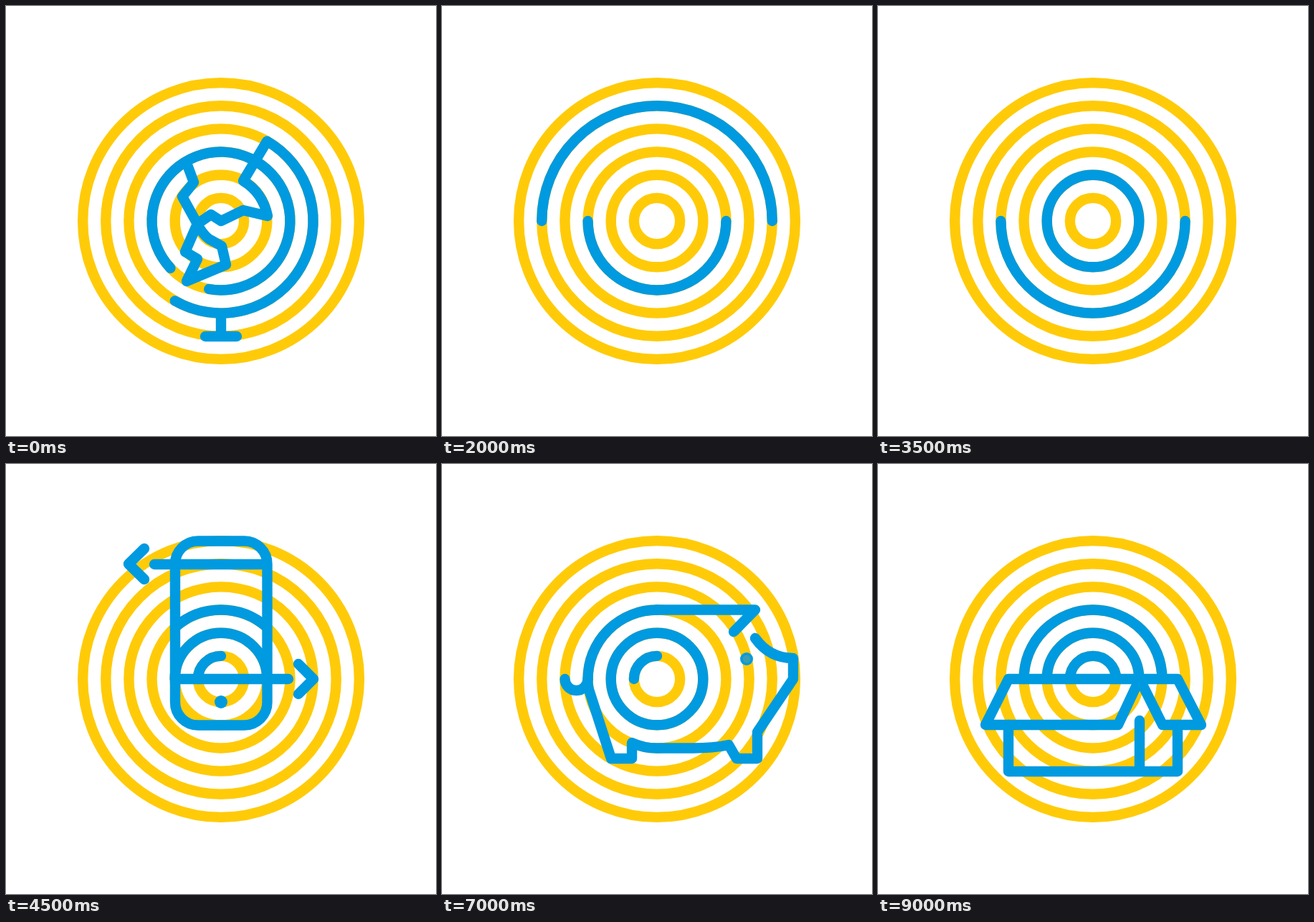
An HTML page with a canvas for the animation above (9.5 s loop, 600 by 600 pixels).

```html
<!DOCTYPE html>
<html lang="en">
<head>
<meta charset="utf-8">
<title>Ring icons</title>
<style>
html, body { margin: 0; width: 100%; height: 100%; overflow: hidden; background: #fff; }
canvas { display: block; width: 600px; height: 600px; }
</style>
</head>
<body>
<canvas id="stage" width="600" height="600"></canvas>
<script>
const ctx = document.getElementById('stage').getContext('2d');
const YELLOW = '#ffcb08', BLUE = '#009ae0';
const C = 300, STEP = 32.15, SLOT = 500;
const radius = n => n * STEP;
const rad = deg => deg * Math.PI / 180;

// Arc on ring n, clockwise from a to b in degrees
function arc(n, a, b) {
  ctx.beginPath();
  ctx.arc(C, C, radius(n), rad(a), rad(b));
  ctx.stroke();
}

function arcs(list) {
  list.forEach(([n, a, b]) => arc(n, a, b));
}

function path(d) {
  ctx.stroke(new Path2D(d));
}

function dot(x, y, r, color = BLUE) {
  ctx.fillStyle = color;
  ctx.beginPath();
  ctx.arc(x, y, r, 0, 2 * Math.PI);
  ctx.fill();
}

function wheel(x, half) {
  if (!half) dot(x, 464.5, 18, '#fff');
  ctx.beginPath();
  ctx.arc(x, 464.5, 17.7, 0, half ? Math.PI : 2 * Math.PI);
  ctx.stroke();
}

function globe() {
  arcs([[3, 137, 460], [4, -60, 120]]);
  path('M364 189L331 244Q358 260 365 293L331 285L300 300L286 291L267 304' +
       'L250 343L267 353L252 384L307 361L301 335L283 325Q273 317 267 304L246 266L262 246L252 219');
  path('M300 429V461M278 461H322');
}

function growth() {
  [1, 2, 3].forEach(n => arc(n, 0, 180));
  path('M171 300H430M253 254L300 300L390 211');
  ctx.lineJoin = 'miter';
  path('M378 186H415V223');
  ctx.lineJoin = 'round';
}

function truck() {
  [1, 2, 3].forEach(n => arc(n, 0, 90));
  path('M300 433V300H511V364M447 300V461M289 461H582');
  path('M447 364H543V397H447M479 364V397');
  path('M492 400L518 429H582M543 397L582 429V461M518 429V461');
  wheel(336.5);
  wheel(404, true);
  wheel(482.5);
  wheel(550, true);
}

function phone() {
  arcs([[3, 228.4, 311.6], [2, 180, 360], [1, 180, 270]]);
  path('M268 107.5H332A32 32 0 0 1 364.5 140V332A32 32 0 0 1 332 364.5' +
       'H268A32 32 0 0 1 236 332V140A32 32 0 0 1 268 107.5Z');
  path('M207 140H364M193 118L171 139.5L193 161');
  path('M236 300H394M408 279L429 300L408 321');
  dot(300, 332, 9);
}

function gauge() {
  arcs([[3, -13, 330], [2, 180, 330], [1, 180, 330]]);
  path('M300 300L412 236M267 346.5H334');
  for (const a of [180, 210, 240, 270, 300, 360]) {
    dot(C + radius(4) * Math.cos(rad(a)), C + radius(4) * Math.sin(rad(a)), 9);
  }
}

function pig() {
  arcs([[3, 180, 270], [2, 0, 360], [1, 180, 270]]);
  path('M300 203.5H437L407 234');
  path('M171.5 300A16 16 0 0 0 203.5 300Q203 310 206 318L236 411H265V389' +
       'Q281 396.5 300 396.5H350Q378 396.5 400 392L411 411H440V374L490 300V271Q457 271 437 243');
  dot(425, 272, 9);
  dot(425, 272, 5.5, '#3a9db2');
}

function carton() {
  [1, 2, 3].forEach(n => arc(n, 180, 360));
  path('M182 300H418L451 364H397L365 300L335 364H150Z');
  path('M182 364V429H418V364M365 358V429');
}

const rings = (...list) => () => arcs(list);

const scenes = [
  globe,
  rings([6, -68, 248], [1, 0, 360]),
  growth,
  rings([6, 90, 270], [2, 180, 360]),
  rings([5, 180, 360], [3, 0, 180]),
  truck,
  rings([4, 180, 360], [2, 0, 360]),
  rings([4, 0, 180], [2, 0, 360]),
  rings([6, 0, 360], [3, 180, 360]),
  phone,
  rings([6, 0, 360], [2, 0, 180]),
  rings([6, 180, 360], [3, 0, 360]),
  gauge,
  rings([6, 120, 240], [6, -60, 60], [2, 0, 360]),
  pig,
  rings([3, 0, 360], [1, 0, 360]),
  rings([6, 122, 247], [6, -67, 58], [3, 180, 360]),
  rings([4, 0, 360], [2, 180, 360]),
  carton
];

function draw(now) {
  const index = Math.floor(now / SLOT) % scenes.length;
  ctx.fillStyle = '#fff';
  ctx.fillRect(0, 0, 600, 600);
  ctx.lineWidth = 14.4;
  ctx.lineCap = ctx.lineJoin = 'round';
  ctx.strokeStyle = YELLOW;
  for (let n = 1; n <= 6; n++) arc(n, 0, 360);
  ctx.strokeStyle = BLUE;
  scenes[index]();
}

let start;
function tick(now) {
  if (start === undefined) start = now;
  draw(now - start);
  requestAnimationFrame(tick);
}
draw(0);
requestAnimationFrame(tick);
</script>
</body>
</html>
```
